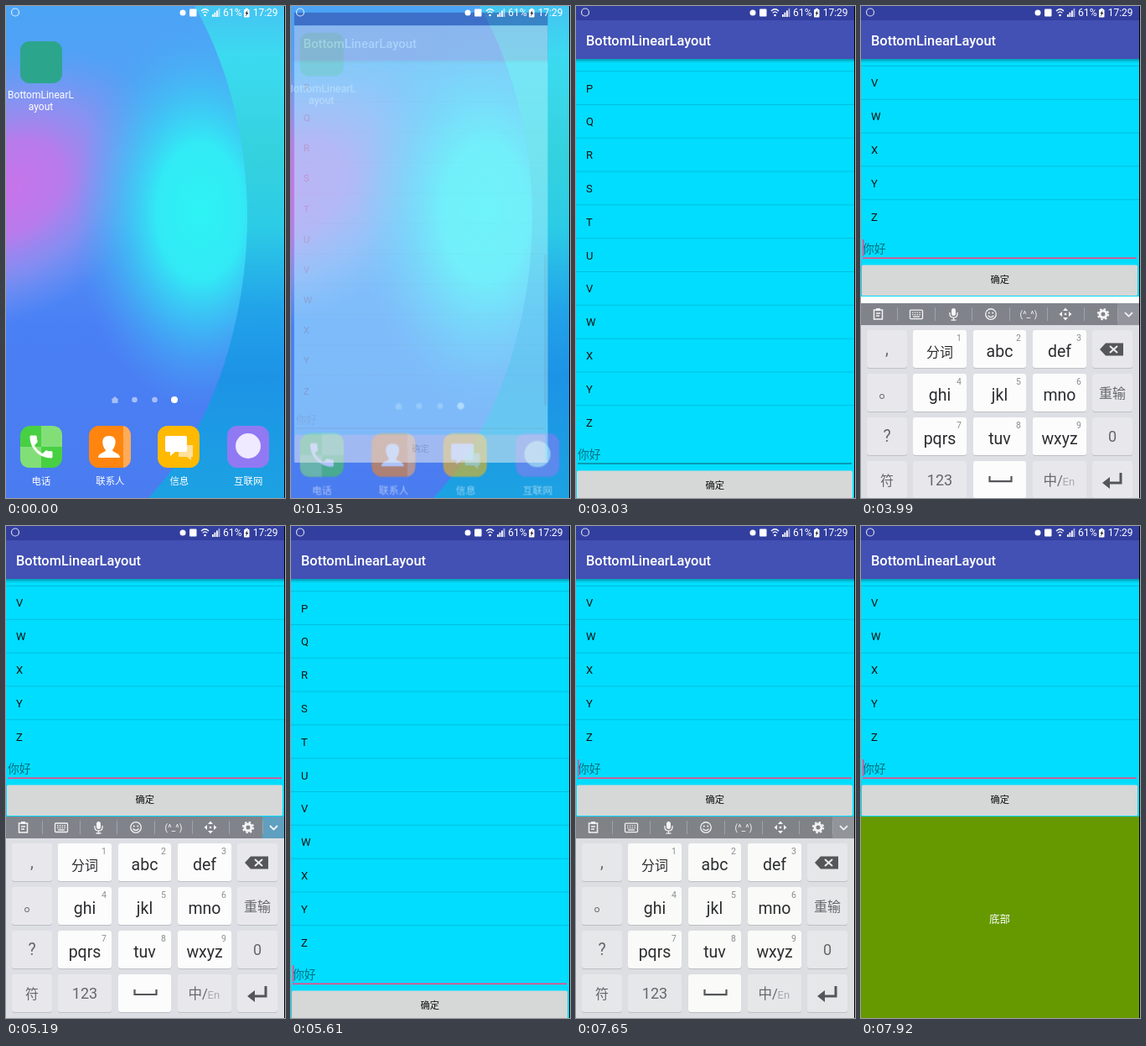
An HTML page that plays this animation: 333 px wide and 586 px high, repeating every 8 s.

```html
<!DOCTYPE html>
<html lang="zh">
<head>
<meta charset="utf-8">
<title>BottomLinearLayout</title>
<style>
html, body { margin: 0; width: 333px; height: 586px; overflow: hidden; background: #fff }
svg { display: block }
text { font-family: Roboto, "Noto Sans CJK SC", "Noto Sans CJK", sans-serif }
</style>
</head>
<body>
<svg width="333" height="586" viewBox="0 0 333 586">
  <defs>
    <linearGradient id="sky" x2="0" y2="1">
      <stop stop-color="#4ba4f6"/><stop offset=".3" stop-color="#5a9cf4"/>
      <stop offset=".65" stop-color="#4a80f5"/><stop offset="1" stop-color="#4a7cf0"/>
    </linearGradient>
    <radialGradient id="pink">
      <stop stop-color="#c873ea"/><stop offset=".35" stop-color="#bd7aeb" stop-opacity=".95"/>
      <stop offset=".65" stop-color="#9c8ef0" stop-opacity=".65"/>
      <stop offset="1" stop-color="#7f96f2" stop-opacity="0"/>
    </radialGradient>
    <radialGradient id="cyan">
      <stop stop-color="#2df3f4"/><stop offset=".35" stop-color="#30eef5" stop-opacity=".95"/>
      <stop offset=".6" stop-color="#38d0f5" stop-opacity=".65"/>
      <stop offset="1" stop-color="#48a8f5" stop-opacity="0"/>
    </radialGradient>
    <linearGradient id="side" x2="0" y2="1">
      <stop stop-color="#44c4f2"/><stop offset=".1" stop-color="#3cdaf0"/>
      <stop offset=".3" stop-color="#34d2de"/><stop offset=".45" stop-color="#2ccbe6"/>
      <stop offset=".62" stop-color="#22a2e9"/><stop offset=".75" stop-color="#1d93e6"/>
      <stop offset="1" stop-color="#1ca2e2"/>
    </linearGradient>
  </defs>
  <g id="wall">
    <rect width="333" height="586" fill="url(#sky)"/>
    <ellipse rx="205" ry="150" fill="url(#pink)" transform="translate(0 218) rotate(-32)"/>
    <ellipse cx="232" cy="245" rx="150" ry="235" fill="url(#cyan)"/>
    <path d="M225 0C265 70 288 160 288 250C288 370 250 500 170 586H333V0Z" fill="url(#side)"/>
  </g>
  <g id="home"></g>
  <g id="app">
    <rect width="333" height="586" fill="#0df"/>
    <g id="body"></g>
    <rect id="bar" x="328" y="317" width="4" height="198" fill="#000" opacity=".35"/>
    <g id="below">
      <rect id="panel" y="346" width="333" height="240"/>
    </g>
    <rect y="63" width="333" height="2" fill="#000" opacity=".25"/>
    <rect y="65" width="333" height="2" fill="#000" opacity=".1"/>
    <rect y="17" width="333" height="46" fill="#4350b4"/>
    <rect width="333" height="17" fill="#323f9f"/>
    <text x="12" y="46.5" font-size="16.4" font-weight="500" fill="#fff">BottomLinearLayout</text>
    <rect id="blank" y="17" width="333" height="573" fill="#fff"/>
  </g>
  <g id="keys"></g>
  <g id="status" fill="#fff"></g>
  <rect x="332" width="1" height="586"/>
</svg>
<script>
const $ = id => document.getElementById(id);
const clamp = v => Math.max(0, Math.min(1, v));
const span = (t, start, length) => clamp((t - start) / length);
const put = (id, ...parts) => $(id).insertAdjacentHTML('beforeend', parts.flat(2).join(''));

const rect = (x, y, w, h, fill, r = 0, more = '') =>
  `<rect x="${x}" y="${y}" width="${w}" height="${h}" rx="${r}" fill="${fill}" ${more}/>`;
const dot = (x, y, r, fill, more = '') => `<circle cx="${x}" cy="${y}" r="${r}" fill="${fill}" ${more}/>`;
const path = (d, fill, more = '') => `<path d="${d}" fill="${fill}" ${more}/>`;
const line = (d, stroke, width = 1.5, more = '') => path(d, 'none', `stroke="${stroke}" stroke-width="${width}" ${more}`);
const text = (x, y, str, size, fill, anchor = 'middle') =>
  `<text x="${x}" y="${y}" font-size="${size}" fill="${fill}" text-anchor="${anchor}">${str}</text>`;

// Home screen
put('home',
  rect(17, 42, 50, 50, '#2ca58d', 11, 'id="icon"'),
  text(41.5, 110, 'BottomLinearL', 12, '#fff'), text(41.5, 124, 'ayout', 12, '#fff'),
  path('M125.5 469L130 465L134.5 469H133.5V473H126.5V469Z', '#fff', 'opacity=".5"'),
  dot(153.5, 469, 3.3, '#fff', 'opacity=".5"'), dot(177.5, 469, 3.3, '#fff', 'opacity=".5"'),
  dot(201, 469, 4, '#fff'),
  rect(17, 500, 50, 50, '#48d043', 12),
  path('M42 500H55Q67 500 67 512V525H17V538Q17 550 29 550H42Z', '#82df78'),
  path('M6.62 10.79c1.44 2.83 3.76 5.14 6.59 6.59l2.2-2.2c.27-.27.67-.36 1.02-.24 1.12.37 2.33.57 3.57.57.55 0 1 .45 1 1V20c0 .55-.45 1-1 1-9.39 0-17-7.61-17-17 0-.55.45-1 1-1h3.5c.55 0 1 .45 1 1 0 1.25.2 2.45.57 3.57.11.35.03.74-.25 1.02z',
    '#fff', 'transform="translate(24 507) scale(1.5)"'),
  rect(99, 500, 50, 50, '#ff850f', 12),
  path('M140 500Q149 502 149 512V538Q149 548 140 550Z', '#ffab58'),
  path('M110 538C110 532 119 532 119 529C114 523 113 512 123 512C133 512 132 523 127 529C127 532 136 532 136 538Z', '#fff'),
  rect(181, 500, 50, 50, '#ffb900', 12),
  path('M206 523H223V537H221V541L216 537H206Z', '#ffe19a'),
  path('M192 512H214Q216 512 216 514V529Q216 531 214 531H202L196 536V531H192Q190 531 190 529V514Q190 512 192 512Z', '#fff'),
  rect(264, 500, 50, 50, '#9179f4', 12), dot(289, 524, 15, '#efeaff'),
  ['电话', '联系人', '信息', '互联网'].map((s, i) => text(42 + 82.4 * i, 569.5, s, 11.4, '#fff')));

// List, input and button
put('body',
  [...'OPQRSTUVWXYZ'].map((c, i) => {
    const y = 58.2 + 39.8 * i;
    return text(12, y + 4.6, c, 13, '#111', 'start') +
      (c < 'Z' ? rect(0, y + 19, 333, 1, '#000', 0, 'opacity=".14"') : '');
  }),
  text(2, 538.5, '你好', 13.8, 'rgba(0,0,0,.5)', 'start'),
  rect(2, 544.5, 327, 1, '#175b65', 0, 'id="rule"'),
  rect(2, 523, 1.5, 20, '#ff4081', 0, 'id="caret"'),
  rect(1, 553.5, 329, 36.5, '#d6d7d7', 1.5),
  text(165.8, 575.3, '确定', 11.3, '#111'));
put('below', text(165.5, 472.8, '底部', 12.5, '#fff'));

// Keyboard, drawn from its own top edge
const ink = '#55565a', light = '#f4f4f5';
const columns = [[7, 48], [62, 64], [134, 63], [205, 64], [276, 48]];
const labels = [
  [',', '分词', 'abc', 'def', ''], ['。', 'ghi', 'jkl', 'mno', '重输'],
  ['?', 'pqrs', 'tuv', 'wxyz', '0'], ['符', '123', '', '', '']
];
const labelSize = s => /[a-z,。?]/.test(s) ? 19.5 : /\d/.test(s) ? 18 : 16;
put('keys',
  rect(0, 0, 333, 300, '#dedfe4'), rect(0, 0, 333, 26, '#80838a'),
  rect(306, 0, 27, 26, '#92959c', 0, 'id="fold"'),
  [43, 88, 132, 177, 222, 266, 306].map(x => rect(x, 5, 1, 16, '#a0a3a9')),
  line('M15.5 8H25.5V19H15.5ZM18 12H23M18 15H22', light), rect(18, 6, 5, 3, light),
  rect(58.5, 8, 15, 10.5, 'none', 1, `stroke="${light}" stroke-width="1.3"`),
  line('M61 11H71M61 13.5H71', light, 1.3, 'stroke-dasharray="1.5 1.3"'), line('M62 16H70', light, 1.3),
  rect(108, 6, 5, 9, light, 2.5), line('M106 11V13Q106 17 110.5 17Q115 17 115 13V11M110.5 17V20M107.5 20H113.5', light, 1.3),
  dot(155, 13, 6.3, 'none', `stroke="${light}" stroke-width="1.3"`),
  dot(152.8, 11.5, 1, light), dot(157.2, 11.5, 1, light), line('M151.5 14.5Q155 18.5 158.5 14.5', light, 1.3),
  text(200, 16.5, '(^_^)', 10.5, light),
  path('M244 5.5L247 9H241ZM244 20.5L247 17H241ZM236.5 13L240 10V16ZM251.5 13L248 10V16Z', light), dot(244, 13, 1.3, light),
  dot(289, 13, 4, 'none', `stroke="${light}" stroke-width="3"`),
  dot(289, 13, 6.2, 'none', `stroke="${light}" stroke-width="2" stroke-dasharray="2.4 2.47"`),
  line('M315 11L319.5 15.5L324 11', light, 1.8),
  labels.map((row, r) => row.map((label, c) => {
    const [x, w] = columns[c], y = 32 + 52 * r;
    const main = c > 0 && c < 4 && r < 3, white = main || r == 3 && c == 2;
    return rect(x, y + 1, w, 45, '#bfc0c6', 3) + rect(x, y, w, 45, white ? '#fcfcfc' : '#e8e8ec', 3) +
      text(x + w / 2, y + (main ? 32 : 28.5), label, labelSize(label), main ? '#2c2d30' : '#66676c') +
      (main ? text(x + w - 9, y + 13, r * 3 + c, 10.5, '#8c8d92') : '');
  })),
  path('M285 55L292 47.5H313V62.5H292Z', ink), line('M297 51L306 59M306 51L297 59', '#eee', 2),
  line('M153.5 206V212H179.5V206', ink, 2.2),
  text(217.5, 217, '中/', 16.5, '#66676c', 'start'), text(240.5, 217, 'En', 13, '#a9aab0', 'start'),
  line('M310 202V214H295', ink, 3), path('M288 214L297 207V221Z', ink));

// Status bar
put('status',
  dot(11, 7.5, 4.5, 'none', 'stroke="#fff" stroke-width="1.2" opacity=".8"'),
  dot(211, 8, 3.5, '#fff'), rect(219, 3.5, 8.5, 9, '#fff', 1),
  line('M233 6Q237.5 1.5 242 6M234.7 8.3Q237.5 5.5 240.3 8.3', '#fff', 1.2), dot(237.5, 11, 1.3, '#fff'),
  [0, 1, 2, 3].map(i => rect(246 + 2.5 * i, 10 - 2.3 * i, 1.8, 3 + 2.3 * i, '#fff', 0, i == 3 ? 'opacity=".6"' : '')),
  text(259, 12.3, '61%', 12.2, '#fff', 'start'),
  rect(284, 4, 6.5, 9.5, '#fff', 1), rect(285.8, 2.8, 3, 2, '#fff'),
  path('M288.5 5L285.5 9H287L286 12.5L289.3 8H287.7Z', '#223'),
  text(294.7, 12.3, '17:29', 12, '#fff', 'start'));

const caretOn = [[3570, 4170], [4680, 5190], [5430, 6090], [6570, 7080], [7590, 8000]];
const within = (t, [from, to]) => t >= from && t < to;
const set = (id, values) => Object.entries(values).forEach(([k, v]) => $(id).setAttribute(k, v));
const zoom = (x, y, s) => `translate(${x} ${y}) scale(${s}) translate(${-x} ${-y})`;

function draw() {
  const t = performance.now() % 8000;

  // Window grows out of the icon while the home screen drifts apart
  const open = span(t, 1230, 270), grow = 1 - (1 - open) ** 2;
  set('home', { opacity: 1 - open, transform: zoom(166.5, 293, 1 + .06 * grow) });
  set('icon', { opacity: t > 1050 && t < 1230 ? .75 : 1 });
  set('app', { opacity: clamp(1.15 * open), transform: zoom(42, 85, .7 + .3 * grow) });
  set('blank', { opacity: clamp(1.25 * (1 - open)) });
  set('bar', { opacity: .35 * (1 - span(t, 2760, 270)) });

  // Content sits above the keyboard or the panel
  const raised = within(t, [3870, 5340]) || t >= 6540;
  set('body', { transform: `translate(0 ${raised ? -245 : 0})` });
  set('below', { opacity: raised ? 1 : 0 });
  set('panel', { fill: t >= 7590 ? '#690' : '#fff' });
  const focused = t >= 3570;
  set('rule', { fill: focused ? '#ff4081' : '#175b65', height: focused ? 1.6 : 1 });
  set('caret', { opacity: caretOn.some(r => within(t, r)) ? 1 : 0 });

  // Keyboard slides and fades
  const second = t >= 6000;
  const show = span(t, second ? 6540 : 3870, 270), hide = span(t, second ? 7620 : 5340, 270);
  set('keys', {
    opacity: Math.min(1, show * 2.5) * (1 - hide ** 2),
    transform: `translate(0 ${346 + 48 * ((1 - show) ** 3 + hide ** 3)})`
  });
  set('fold', { fill: within(t, [5100, 5340]) ? '#5f9fc0' : '#92959c' });
  requestAnimationFrame(draw);
}
draw();
</script>
</body>
</html>
```
